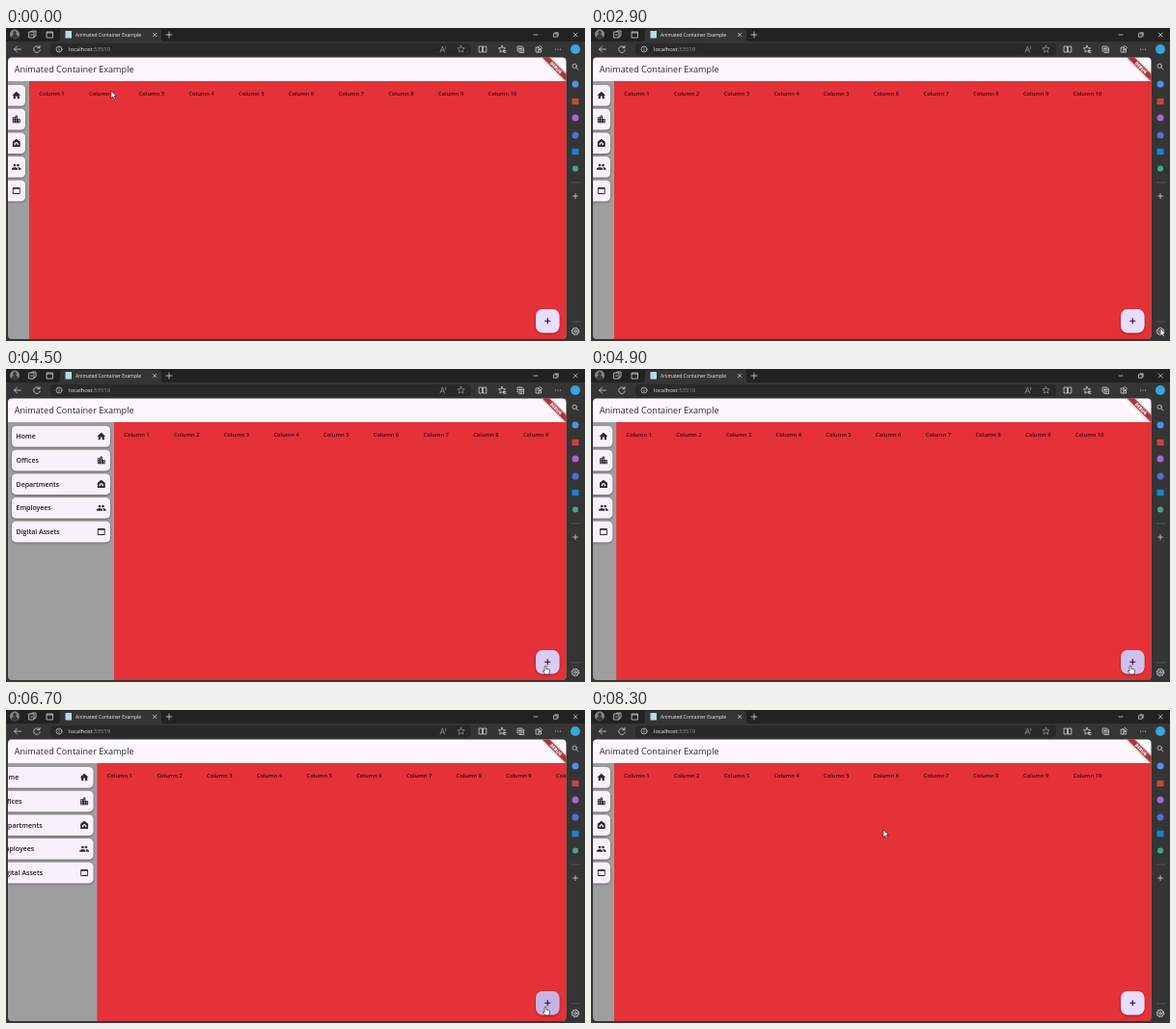
An HTML page for the animation above (8.4 s loop, 600x324 px).

```html
<!DOCTYPE html>
<html lang="en">
<head>
<meta charset="utf-8">
<title>Animated Container Example</title>
<style>
  html, body { margin: 0; width: 100%; height: 100%; overflow: hidden; background: #222; }
  svg { display: block; width: 100vw; height: 100vh; font-family: "Open Sans", "Noto Sans", sans-serif; }
  .line { fill: none; stroke: #ddd; stroke-width: .75; stroke-linecap: round; stroke-linejoin: round; }
  .dim { stroke: #999; }
  .ink { fill: #2b2930; fill-rule: evenodd; }
  .column { font-size: 5.75px; font-weight: 600; fill: #35080d; }
  .label { font-size: 7px; font-weight: 600; fill: #1d1b20; }
</style>
</head>
<body>
<svg viewBox="0 0 600 324">
  <defs>
    <clipPath id="page"><rect x="2" y="30.5" width="578.5" height="291.5" rx="4"/></clipPath>
    <clipPath id="rail"><rect id="railClip" x="2" y="55" height="267"/></clipPath>
    <filter id="shadow" x="-30%" y="-30%" width="160%" height="170%">
      <feDropShadow dx="0" dy=".8" stdDeviation=".9" flood-opacity=".45"/>
    </filter>
    <filter id="blur" x="-20%" y="-60%" width="140%" height="220%"><feGaussianBlur stdDeviation="1"/></filter>
  </defs>

  <!-- Browser frame -->
  <rect width="600" height="324" fill="#353535"/>
  <rect width="600" height="14" fill="#222"/>
  <path d="M53 14q3 0 3-3V4q0-3 3-3h99q3 0 3 3v7q0 3 3 3z" fill="#353535"/>
  <circle cx="9" cy="6.5" r="5" fill="#8b8783"/>
  <path d="M5.3 10q.3-3 2.6-3.3a2 2 0 1 1 2.2 0q2.3.3 2.6 3.3-3.6 3-7.4 0z" fill="#3c3a39"/>
  <rect x="61.5" y="3" width="6.5" height="7.5" fill="#b5dcec"/>
  <text x="72" y="9" font-size="5" fill="#f0f0f0">Animated Container Example</text>
  <rect x="46" y="16" width="436" height="12.5" rx="4" fill="#292929"/>
  <text x="65" y="24.3" font-size="5.9" fill="#f2f2f2">localhost<tspan fill="#999">:53519</tspan></text>
  <g class="line">
    <path d="M24 4h5v6h-5zM26 4l1-1h4v5l-2 1M25.500 7h2"/>
    <path d="M42.500 4h6v6h-6zM42.500 5h6"/>
    <path d="M152.500 5.300l3.400 3.400m0-3.400l-3.400 3.400M169 4v6m-3-3h6"/>
    <path d="M547 7h4M567.800 5.800h3.400v3.400h-3.400zM569 4.800h3.200V8M588.200 5l4 4m0-4l-4 4"/>
    <path d="M15.500 22h-7m3-3l-3 3 3 3"/>
    <path d="M34.800 20.300a3.300 3.300 0 1 0 .5 2.500M35 18.300v2.300h-2.400"/>
    <path d="M490.500 19h3v6h-3zM494.800 19h3v6h-3z"/>
    <path d="M530.500 19h4.500v5h-4.500zM532 25.500h4.500v-5M532.800 20v3m-1.500-1.500h3"/>
    <path d="M549.500 20h2.500v5h-2.500zM552 22.500h2.500V25H552M553.500 18.500l2 2-1.500 1.500-2-2z"/>
    <path d="M569.500 22h.01M572 22h.01M574.500 22h.01" stroke-width="1.1"/>
    <path d="M586 160h9M586 304h9" stroke="#777" stroke-width=".5"/>
    <path d="M590 171.500v5m-2.500-2.500h5"/>
    <circle cx="589.200" cy="39.300" r="2.200"/><path d="M591 41l2 2"/>
    <circle cx="590" cy="314" r="1.300"/>
    <circle cx="590" cy="314" r="3.300"/>
    <circle cx="590" cy="314" r="3.900" stroke-dasharray="1.500 1.560" stroke-linecap="butt"/>
  </g>
  <g class="line dim">
    <circle cx="55" cy="22" r="3" stroke="#ccc"/><path d="M55 21.700v1.800M55 20.400v.01" stroke="#ccc"/>
    <path d="M450 25l2.300-6 2.300 6m-3.800-2h3M455.500 19q1 1 0 2.500"/>
  </g>
  <path class="line dim star" transform="translate(471.5 22)"/>
  <path class="line star" transform="translate(514 22)"/>
  <path class="line" d="M515.500 23.500h2.500m-2 1.800h2"/>
  <g id="shortcuts"></g>

  <!-- App -->
  <g clip-path="url(#page)">
    <rect y="30" width="582" height="26" fill="#fef7ff"/>
    <text x="8.7" y="46.4" font-size="9.1" fill="#29272c">Animated Container Example</text>
    <rect y="55" width="582" height="268" fill="#9e9e9e"/>
    <g clip-path="url(#rail)"><g id="cards"></g></g>
    <g id="content"><rect y="55" width="600" height="268" fill="#e43238"/></g>
    <g transform="translate(580.5 30.5) rotate(45)">
      <rect x="-17.500" y="12.250" width="35" height="5.250" opacity=".5" filter="url(#blur)"/>
      <rect x="-17.500" y="12.250" width="35" height="5.250" fill="#b71c1c" fill-opacity=".75"/>
      <text y="16.500" font-size="4.460" font-weight="800" text-anchor="middle" fill="#fff">DEBUG</text>
    </g>
    <g filter="url(#shadow)"><rect x="549" y="291" width="24.500" height="24.500" rx="7" fill="#eaddff"/></g>
    <rect id="splash" x="549" y="291" width="24.500" height="24.500" rx="7" fill="#21005d"/>
    <path d="M561.250 300.200v6.100m-3.050-3.050h6.100" stroke="#21005d" stroke-width="1.100"/>
  </g>

  <path id="arrow" d="M0 0v7.600l1.800-1.600 1.100 2.500 1.300-.6L3.100 5.500h2.300z" fill="#fff" stroke="#111" stroke-width=".55"/>
  <path id="hand" d="M-.9 5V.7q.9-1.300 1.800 0v2.800l2.700.6q1 .3.900 1.500L3.900 9H.2L-2.800 6q.3-1.500 1.900-.2z"
        fill="#fff" stroke="#111" stroke-width=".6"/>
</svg>
<script>
const $ = id => document.getElementById(id);
const LOOP = 8400, STEP = 100, OPEN_TIME = 400;
const CLOSED = 24, OPENED = 112;
const clicks = [3700, 4510, 5420, 6620];
const cursorPath = [
  [0, 109, 65], [900, 109, 65], [2400, 590, 311], [3000, 590, 311],
  [3500, 559, 307], [7000, 559, 307], [7900, 303, 124], [LOOP, 303, 124]
];

const clamp = v => Math.max(0, Math.min(1, v));
const square = ([x, y]) => `M${x} ${y}h2v2h-2z`;
const windows = [[5, 9], [5, 13], [5, 17], [11, 5], [11, 9], [11, 13], [11, 17], [17, 13], [17, 17]];

// Icons on a 24-unit grid
const items = [
  ["Home", "M10 20v-6h4v6h5v-8h3L12 3 2 12h3v8z"],
  ["Offices", "M3 21V7h6V5l3-3 3 3v6h6v10z" + windows.map(square).join("")],
  ["Departments", "M12 2L3 9v12h18V9zM12 9l-5 4v4h10v-4zM10 13h4v4h-4z"],
  ["Employees", "M8 5a3 3 0 1 0 .01 0zM1 19v-2.500c0-4.700 14-4.700 14 0V19z" +
    "M16 5a3 3 0 1 0 .01 0zM17 19v-2.500q0-2-2-3.450c4-.4 8 1.200 8 3.450V19z"],
  ["Digital Assets", "M5 4h14q2 0 2 2v12q0 2-2 2H5q-2 0-2-2V6q0-2 2-2zM5 8v10h14V8z"]
];

// Card positions are relative to the right edge of the rail.
$("cards").innerHTML = items.map(([name, icon], i) => `
  <g transform="translate(0 ${59 + i * 24.7})">
    <rect x="-106" width="102" height="21.500" rx="4.500" fill="#f8f1fb" filter="url(#shadow)"/>
    <text class="label" x="-101.500" y="13.300">${name}</text>
    <path class="ink" d="${icon}" transform="translate(-18.500 5.400) scale(.4375)"/>
  </g>`).join("");

$("content").innerHTML += Array.from({ length: 10 }, (_, i) =>
  `<text class="column" x="${10.3 + i * 51.7}" y="69.800">Column ${i + 1}</text>`).join("");

const starPath = "M" + Array.from({ length: 10 }, (_, i) => {
  const r = i % 2 ? 1.8 : 3.8, a = i * Math.PI / 5;
  return `${(r * Math.sin(a)).toFixed(2)} ${(-r * Math.cos(a)).toFixed(2)}`;
}).join("L") + "z";
document.querySelectorAll(".star").forEach(el => el.setAttribute("d", starPath));

const dot = (y, color, r = 3.5) => `<circle cx="590" cy="${y}" r="${r}" fill="${color}"/>`;
const tile = (y, color) => `<rect x="586.500" y="${y - 3.2}" width="7" height="6.400" fill="${color}"/>`;
$("shortcuts").innerHTML = dot(22, "#38a5dc", 5) + dot(58, "#4d91ed") + tile(76, "#c8453b") +
  dot(93, "#a767d0") + dot(111, "#536fd6") + tile(128, "#1b82cf") + dot(145.5, "#49a58f", 3);

function railWidth(t) {
  let open = 0;
  clicks.forEach((start, i) => {
    const p = clamp((t - start) / OPEN_TIME);
    if (t >= start) open = i % 2 ? 1 - p : p;
  });
  return CLOSED + (OPENED - CLOSED) * open;
}

function cursorAt(t) {
  const i = cursorPath.findIndex(p => p[0] > t);
  const [t0, x0, y0] = cursorPath[i - 1], [t1, x1, y1] = cursorPath[i];
  const p = (t - t0) / (t1 - t0), e = p * p * (3 - 2 * p);
  return [x0 + (x1 - x0) * e, y0 + (y1 - y0) * e];
}

function draw(now) {
  const t = Math.floor(now % LOOP / STEP) * STEP;
  const width = railWidth(t);
  $("cards").setAttribute("transform", `translate(${width})`);
  $("content").setAttribute("transform", `translate(${width})`);
  $("railClip").setAttribute("width", width - 2);

  const [x, y] = cursorAt(t);
  const hover = x > 549 && x < 573.5 && y > 291 && y < 315.5;
  const press = Math.max(...clicks.map(c => t < c ? 0 : clamp((500 - t + c) / 250)));
  $("splash").setAttribute("opacity", (hover ? .08 : 0) + .1 * press);
  for (const [id, shown] of [["arrow", !hover], ["hand", hover]]) {
    $(id).setAttribute("transform", `translate(${x} ${y})`);
    $(id).setAttribute("visibility", shown ? "visible" : "hidden");
  }
  requestAnimationFrame(draw);
}
requestAnimationFrame(draw);
</script>
</body>
</html>
```
